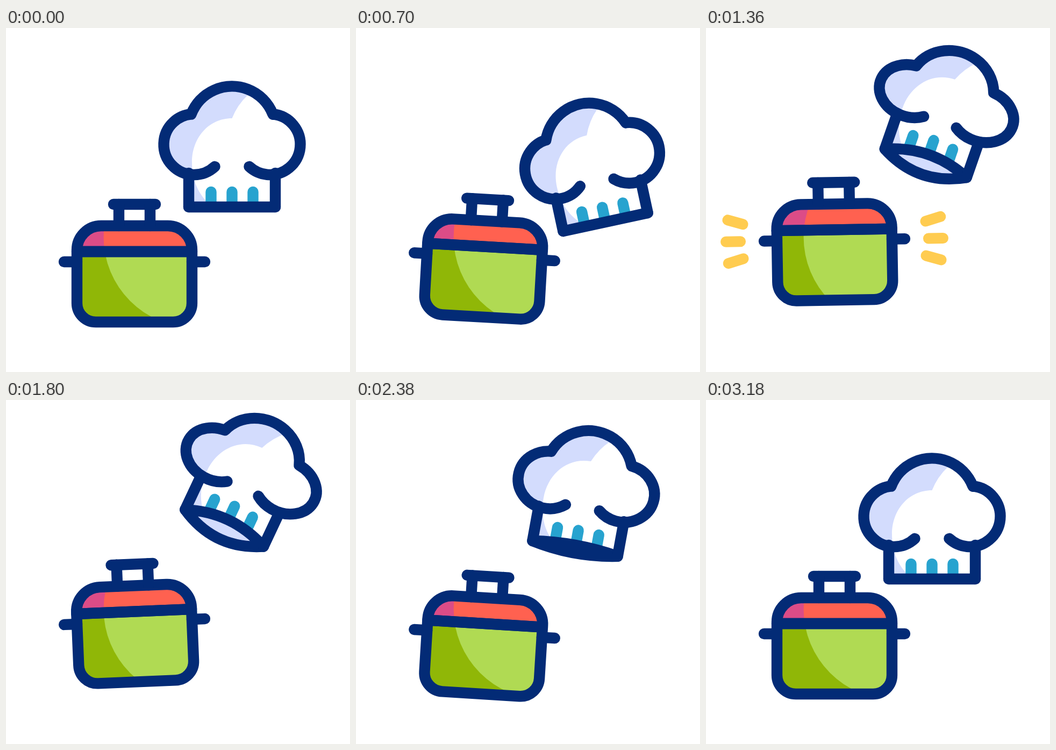
Recreate the animation shown at these times as an HTML page with a canvas. Size 640 by 640 pixels, loop 3200 ms.

```html
<!DOCTYPE html>
<html lang="en">
<head>
<meta charset="utf-8">
<title>Cooking</title>
<style>
  html, body { margin: 0; width: 100%; height: 100%; overflow: hidden; background: #fff; }
  canvas { display: block; width: 640px; height: 640px; }
</style>
</head>
<body>
<canvas id="stage" width="640" height="640"></canvas>
<script>
const ctx = document.getElementById('stage').getContext('2d');
const LOOP = 3200, STEP = 20, LINE = 20.4;
const RAD = Math.PI / 180;
const NAVY = '#032b76', PALE = '#d3dcfd', TEAL = '#27a3cf', YELLOW = '#ffcc50';

// Hat: time, shift x, shift y, degrees, around the middle of the crown
const HAT = [
  [100, 0, 0, 0],
  [700, 15.5, 31, -12.2],
  [1360, 32, -74, 19.2],
  [1800, 42.2, -82, 25.2],
  [2160, 64, -90, 31],
  [2380, 10.8, -54.4, 10.3],
  [2640, 7.1, 18.5, -8.6],
  [2960, 1, -11, 2],
  [3180, 0, 0, 0]
];

// Pot: time and height of each bob, time and degrees of each swing
const BOB = [[100, 435], [300, 446], [1250, 393], [1800, 412.5], [2380, 435], [2680, 445.5], [3180, 435]];
const SWING = [[100, 0], [320, -6], [850, 5.5], [1650, -3.7], [2278, 5.5], [2660, -5.8], [3180, 0]];

const mix = (a, b, k) => a + (b - a) * k;
const clamp = k => Math.min(1, Math.max(0, k));
const smooth = k => k * k * (3 - 2 * k);
const ramp = (t, from, to) => smooth(clamp((t - from) / (to - from)));

// Smooth curve through the keys, flat at every turning point
function sample(keys, t, col = 1) {
  const last = keys.length - 1;
  if (t <= keys[0][0]) return keys[0][col];
  if (t >= keys[last][0]) return keys[last][col];
  const i = keys.findIndex(k => k[0] > t) - 1;
  const slope = j => (keys[j + 1][col] - keys[j][col]) / (keys[j + 1][0] - keys[j][0]);
  const tangent = j => {
    if (j === 0 || j === last) return 0;
    const a = slope(j - 1), b = slope(j);
    return a * b <= 0 ? 0 : 2 * a * b / (a + b);
  };
  const span = keys[i + 1][0] - keys[i][0];
  const u = (t - keys[i][0]) / span;
  return mix(keys[i][col], keys[i + 1][col], smooth(u))
    + span * u * (1 - u) * ((1 - u) * tangent(i) - u * tangent(i + 1));
}

function pen(color, width = LINE) {
  ctx.strokeStyle = color;
  ctx.lineWidth = width;
  ctx.lineCap = ctx.lineJoin = 'round';
}

function line(x1, y1, x2, y2) {
  ctx.beginPath();
  ctx.moveTo(x1, y1);
  ctx.lineTo(x2, y2);
  ctx.stroke();
}

function place(x, y, deg) {
  ctx.translate(x, y);
  ctx.rotate(deg * RAD);
}

// The lit circle stays still while the pot moves over it
function litFill(path, dark, light) {
  ctx.save();
  ctx.clip(path);
  ctx.setTransform(1, 0, 0, 1, 0, 0);
  ctx.fillStyle = dark;
  ctx.fillRect(0, 0, 640, 640);
  ctx.fillStyle = light;
  ctx.beginPath();
  ctx.arc(349.6, 389, 168, 0, 7);
  ctx.fill();
  ctx.restore();
}

const lid = new Path2D('M-107-19V-22A45 45 0 0 1-62-67H62A45 45 0 0 1 107-22V-19Z');
const bowl = new Path2D('M-107-19V77A35 35 0 0 0-72 112H72A35 35 0 0 0 107 77V-19Z');

function drawSparks(t) {
  const from = ramp(t, 1500, 1680), to = ramp(t, 980, 1140);
  if (to - from < 0.01) return;
  pen(YELLOW, 20);
  const ray = (x1, y1, x2, y2) => line(
    mix(x1, x2, from), mix(y1, y2, from), mix(x1, x2, to), mix(y1, y2, to));
  for (const side of [-1, 1]) {
    ray(175 * side, 0, 202 * side, 0);
    for (const up of [-1, 1]) ray(170 * side, 32 * up, 198 * side, 40.3 * up);
  }
}

function drawPot(t) {
  ctx.save();
  place(239, sample(BOB, t), sample(SWING, t));
  drawSparks(t);
  litFill(lid, '#dc4c87', '#ff6150');
  litFill(bowl, '#90b707', '#b0da53');
  pen(NAVY);
  ctx.stroke(lid);
  ctx.stroke(bowl);
  line(-39, -107, 39, -107);
  for (const side of [-1, 1]) {
    line(29 * side, -107, 29 * side, -67);
    line(107 * side, 0, 131 * side, 0);
  }
  ctx.restore();
}

const shade = new Path2D(
  'M0-165C-44-165-74.5-128-74.5-83C-74.5-53-65-29-47-10V30H-180V-260H70Q42-220 29-208Q10-190 0-165Z');

function drawHat(t) {
  const tilt = sample(HAT, t, 3);
  // Tilted far enough, the hat shows its opening and the crown flattens
  const open = clamp((tilt - 5) / 14);
  const up = 17 * open, down = 22 * open;
  const lobeY = mix(-116.5, -117.5, open);
  const lobeW = mix(56.5, 59.5, open), lobeH = mix(56.5, 48, open);
  const domeW = mix(81.5, 80, open), domeH = mix(81.5, 74, open);
  const arm = mix(47, 49.7, open), notch = 264.4;
  const brow = mix(201.1, 198, open);
  const lobe = (path, side, a, b) =>
    path.ellipse(70.5 * side, lobeY, lobeW, lobeH, 0, a * RAD, b * RAD);
  const dome = (path, a, b) =>
    path.ellipse(0, -143, domeW, domeH, 0, a * RAD, b * RAD);

  ctx.save();
  place(420.5 + sample(HAT, t, 1), 200 + sample(HAT, t, 2), tilt);
  ctx.translate(0, 133);

  const inside = new Path2D();
  for (const side of [-1, 1]) {
    lobe(inside, side, 0, 360);
    inside.closePath();
  }
  dome(inside, 0, 360);
  inside.closePath();
  inside.rect(-80.5, -95, 161, 95);
  ctx.fillStyle = '#fff';
  ctx.fill(inside);
  ctx.save();
  ctx.clip(inside);
  ctx.fillStyle = PALE;
  ctx.fill(shade);
  ctx.restore();

  pen(TEAL);
  for (const x of [-39, 0, 39]) {
    const lift = up * (1 - (x / 80.5) ** 2);
    line(x, -28 - lift, x, -8 - lift);
  }

  const mouth = new Path2D();
  mouth.moveTo(-80.5, 0);
  mouth.quadraticCurveTo(0, -2 * up, 80.5, 0);
  mouth.quadraticCurveTo(0, 2 * down, -80.5, 0);
  mouth.closePath();
  ctx.fillStyle = PALE;
  ctx.fill(mouth);
  pen(NAVY);
  ctx.stroke(mouth);
  const top = mix(-63, -70, open);
  for (const side of [-1, 1]) line(80.5 * side, top, 80.5 * side, 0);

  const cloud = new Path2D();
  lobe(cloud, -1, arm, notch);
  dome(cloud, brow, 540 - brow);
  lobe(cloud, 1, 540 - notch, 540 - arm);
  ctx.stroke(cloud);
  ctx.restore();
}

function frame(now) {
  const t = Math.floor((now % LOOP) / STEP) * STEP;
  ctx.fillStyle = '#fff';
  ctx.fillRect(0, 0, 640, 640);
  drawPot(t);
  drawHat(t);
}

const start = performance.now();
function tick() {
  frame(performance.now() - start);
  requestAnimationFrame(tick);
}
tick();
</script>
</body>
</html>
```
